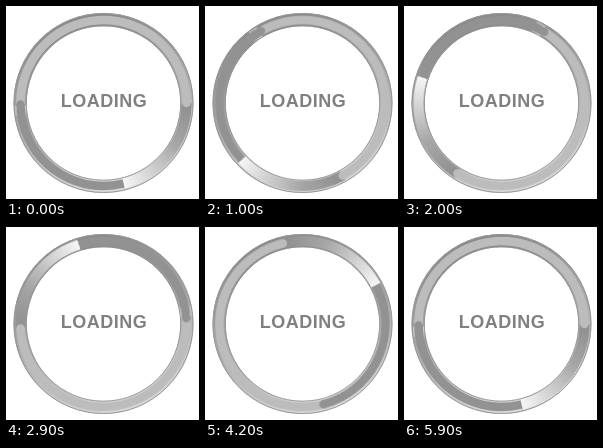
Animation, 193 px wide and 193 px high, one loop 6000 ms. Source, as an HTML page:

```html
<!DOCTYPE html>
<html lang="en">
<head>
<meta charset="utf-8">
<title>Loading</title>
<style>
  html, body { margin: 0; width: 100%; height: 100%; overflow: hidden; background: #fff; }
  .stage { position: relative; width: 193px; height: 193px; }
  .stage > * { position: absolute; left: 0; top: 0; width: 193px; height: 193px; }
  .spin {
    transform-origin: 97.5px 97px;
    animation: turn 6s steps(60, jump-none) infinite;
  }
  .sheen {
    --ring: radial-gradient(circle at 97.5px 97px, #0000 77.6px, #000 78.4px, #000 87.6px, #0000 88.4px);
    background: conic-gradient(from 90deg at 97.5px 97px, #8e8e8e, #a6a6a6 30deg, #d2d2d2 55deg, #f6f6f6 76deg, #0000 76deg);
    -webkit-mask: var(--ring);
    mask: var(--ring);
  }
  @keyframes turn { to { transform: rotate(360deg); } }
  text { font: bold 18px "Liberation Sans", Arial, sans-serif; fill: #808080; }
</style>
</head>
<body>
<div class="stage">
  <svg viewBox="0 0 193 193" fill="none">
    <defs>
      <linearGradient id="metal" x1=".35" y1="0" x2=".65" y2="1">
        <stop offset="0" stop-color="#8a8a8a"/>
        <stop offset=".5" stop-color="#a8a8a8"/>
        <stop offset="1" stop-color="#dadada"/>
      </linearGradient>
    </defs>
    <circle cx="97.5" cy="97" r="83.4" stroke="url(#metal)" stroke-width="13.2"/>
    <circle cx="97.5" cy="97" r="89.5" stroke="#989898"/>
    <circle cx="97.5" cy="97" r="77.2" stroke="#909090" stroke-width=".8"/>
  </svg>
  <div class="sheen spin"></div>
  <svg class="spin" viewBox="0 0 193 193" fill="none">
    <g transform="translate(97.5 97)">
      <!-- pale band, rounded at its trailing end -->
      <g stroke="#bcbcbc" stroke-width="8.6">
        <circle r="83" pathLength="360" stroke-dasharray="184 360" transform="rotate(176)"/>
        <circle cx="83" r="4.3" fill="#bcbcbc" stroke="none"/>
      </g>
      <!-- dark band, rounded at its leading end -->
      <path d="M-78 10V0A4.6 4.6 0 0 1 -87.8 0V10" stroke="#d0d0d0" transform="rotate(-2)"/>
      <g stroke="#929292" stroke-width="8.4">
        <circle r="83" pathLength="360" stroke-dasharray="103 360" transform="rotate(76)"/>
        <circle cx="-83" r="4.2" fill="#929292" stroke="none" transform="rotate(-1)"/>
      </g>
    </g>
  </svg>
  <svg viewBox="0 0 193 193">
    <text x="54.8" y="101" letter-spacing=".5">LOADING</text>
  </svg>
</div>
</body>
</html>
```
